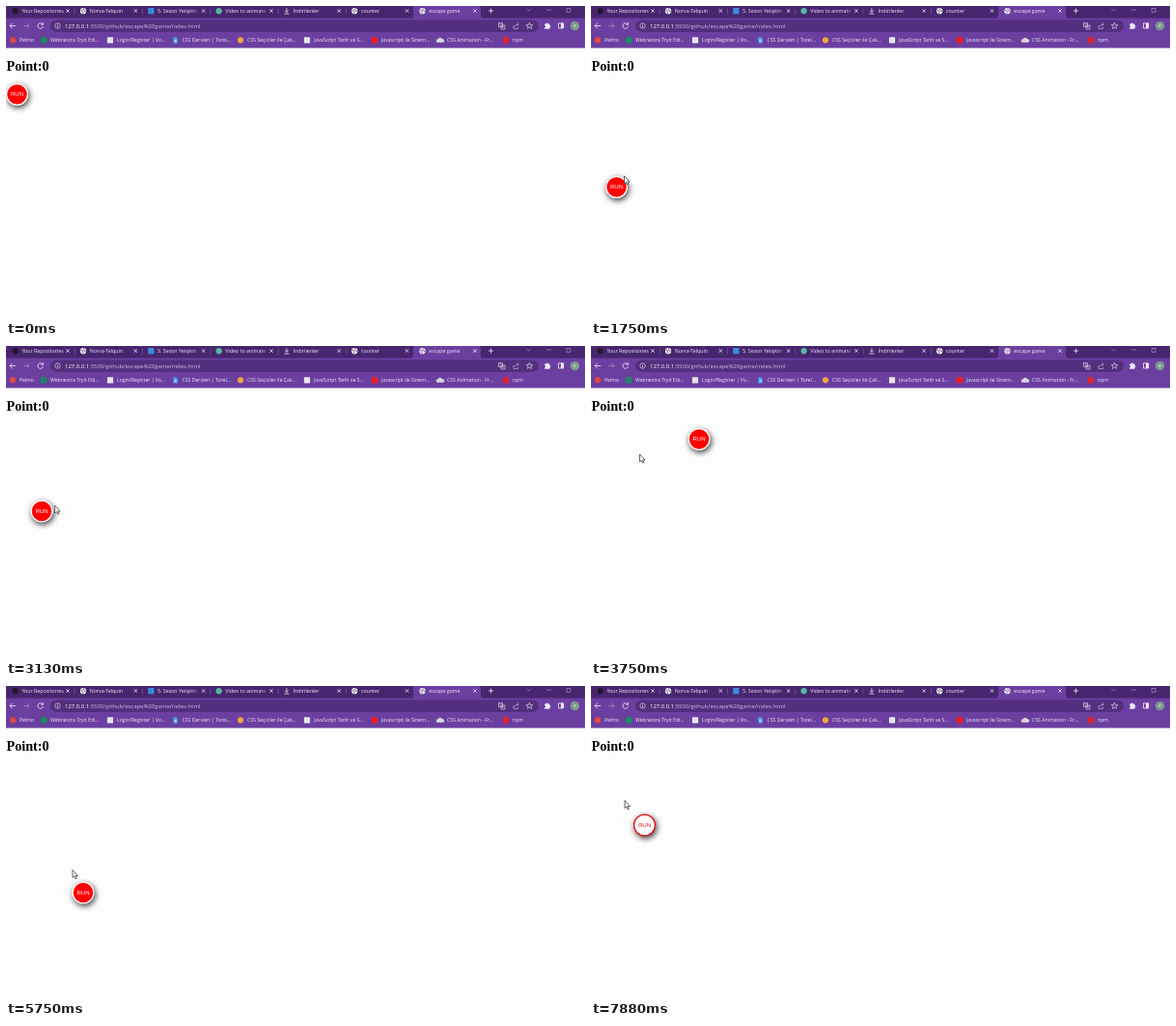
Write an HTML page that moves like this. It is 600 by 323 pixels and loops after 8000 ms.

```html
<!DOCTYPE html>
<html lang="tr">
<head>
<meta charset="utf-8">
<title>escape game</title>
<style>
  html, body { margin: 0; width: 100%; height: 100%; overflow: hidden; background: #fdfdfe; }
  svg { display: block; width: 100vw; height: 100vh; }
  text { font-family: "Open Sans", "Noto Sans", sans-serif; white-space: pre; }
  .heading { font: bold 14.2px "Liberation Serif", Times, serif; }
  .label { font: 6.1px "Liberation Sans", Arial, sans-serif; text-anchor: middle; }
  .line { fill: none; stroke: #f1eaf8; stroke-width: .8; }
</style>
</head>
<body>
<svg id="stage" viewBox="0 0 600 323" preserveAspectRatio="none">
  <defs>
    <linearGradient id="fade">
      <stop offset="0" stop-color="#47266f" stop-opacity="0"/>
      <stop offset="1" stop-color="#47266f"/>
    </linearGradient>
    <filter id="blur" x="-100%" y="-100%" width="300%" height="300%">
      <feGaussianBlur stdDeviation="3.4"/>
    </filter>
    <g id="globe">
      <circle r="3.1" fill="#f7f3fb"/>
      <path d="M-2.3-.9Q-.6-.9-.4.3T-.7 2.4M.5-2.6Q0-.9 1.1-.6T2.4.7" fill="none" stroke="#4b2b73" stroke-width=".8"/>
    </g>
    <path id="close" d="M-1.7-1.7 1.7 1.7M1.7-1.7-1.7 1.7" class="line"/>
  </defs>

  <rect width="600" height="323" fill="#fdfdfe"/>
  <rect width="600" height="13" fill="#47266f"/>
  <rect y="12.5" width="600" height="31" fill="#6b3fa0"/>
  <path d="M419 13Q422 13 422 10V2Q422 0 424 0H490Q492 0 492 2V10Q492 13 495 13Z" fill="#6b3fa0"/>
  <g id="tabs"></g>

  <g class="line">
    <path d="M502.5 2.5V7.5M500 5H505"/>
    <path d="M539.3 3 541.5 5 543.7 3M560 4H565M581 2.5h4v3.8h-4z" stroke-width=".6" opacity=".65"/>
  </g>

  <rect x="46" y="14.5" width="506" height="12.4" rx="6.2" fill="#52307e"/>
  <g class="line">
    <path d="M10 20.5H4M6.8 17.7 4 20.5 6.8 23.3"/>
    <path d="M18 20.5H24M21.2 17.7 24 20.5 21.2 23.3" opacity=".4"/>
    <path d="M38.1 18.9A2.8 2.8 0 1 0 38.5 21.2M38.5 17.2V19.3H36.3"/>
    <circle cx="53.5" cy="20.5" r="2.7" stroke-width=".6"/>
    <path d="M53.5 20V22M53.5 18.7V19.3" stroke-width=".7"/>
    <path d="M510.5 17.5h4v4h-4zM513 20h4v4h-4zM511.5 19h2M514 22h2" stroke-width=".6"/>
    <path d="M526 20V23.5H530.5V22M527 21.5Q527.5 19 531 19M529.5 17.3 531.3 19 529.5 20.7" stroke-width=".6" opacity=".8"/>
    <path d="M542.5 17.2 543.4 19.5 545.8 19.6 543.9 21.1 544.6 23.4 542.5 22.1 540.4 23.4 541.1 21.1 539.2 19.6 541.6 19.5Z" stroke-width=".6"/>
    <path d="M572.5 17.8h5.2v5.2h-5.2z"/>
  </g>
  <path d="M575 17.8h2.7v5.2h-2.7z" fill="#f1eaf8"/>
  <path d="M558.2 18.6h1.6a1 1 0 1 1 2 0h1.6v1.7a1 1 0 1 1 0 2v1.4h-5.2v-1.6a.9.9 0 1 0 0-1.8z" fill="#f1eaf8"/>
  <circle cx="589.5" cy="20.6" r="4.7" fill="#7d9c8e"/>
  <text x="588" y="22.2" font-size="5" fill="#e8f0ec">e</text>
  <text x="61" y="22.7" font-size="5.95" fill="#cdbde2"><tspan fill="#fff">127.0.0.1</tspan>:5500/github/escape%20game/index.html</text>
  <g id="bookmarks"></g>

  <text class="heading" x=".5" y="66.5">Point:0</text>
  <g id="button">
    <circle cx="1.2" cy="2.3" r="11.4" fill="#000" opacity=".82" filter="url(#blur)"/>
    <circle id="face" r="10.9" stroke-width="1.3"/>
    <text id="run" class="label" y="1.9">RUN</text>
  </g>
  <path id="cursor" d="M0 0V8L1.8 6.4 3.1 9.2 4.3 8.7 3.1 6H5.5Z" fill="#fff" stroke="#333" stroke-width=".75" stroke-linejoin="round"/>
</svg>
<script>
const $ = id => document.getElementById(id);
const LOOP = 8000, STEP = 125;

const text = (x, y, size, content) =>
  `<text x="${x}" y="${y}" font-size="${size}" fill="#f1eaf8">${content}</text>`;
const globe = (x, y) => `<use href="#globe" x="${x}" y="${y}"/>`;
const dot = (x, y, color) => `<circle cx="${x}" cy="${y}" r="3.1" fill="${color}"/>`;
const block = (x, y, color) =>
  `<rect x="${x - 3.1}" y="${y - 3.1}" width="6.2" height="6.2" rx=".5" fill="${color}"/>`;
const download = (x, y) =>
  `<path class="line" d="M${x} ${y - 3}v4M${x - 1.8} ${y - .6}l1.8 1.8 1.8-1.8M${x - 2.5} ${y + 2.8}h5"/>`;
const sheet = (x, y) =>
  `<path d="M${x - 2.2} ${y - 3}h3l1.6 1.6v4.5h-4.6z" fill="#4a9df0"/><path class="line" d="M${x - 1} ${y}h2M${x - 1} ${y + 1.4}h2" stroke-width=".5"/>`;
const cloud = (x, y) =>
  `<path d="M${x - 3} ${y + 2.5}a1.8 1.8 0 0 1 .6-3.5 2.5 2.5 0 0 1 4.6 0 1.8 1.8 0 0 1 .8 3.5z" fill="#d9d6de"/>`;

const tabs = [
  ["Your Repositories", dot, "#24182f"],
  ["Norva-Telquin", globe],
  ["5. Sezon Yetişkin", block, "#3b8be0"],
  ["Video to animate", dot, "#58b8a5"],
  ["İndirilenler", download],
  ["counter", globe],
  ["escape game", globe]
];
$("tabs").innerHTML = tabs.map(([title, icon, color], i) => {
  const x = i * 70.3, close = i < 6 ? 64 + x : 486;
  const fade = i === 2 || i === 3
    ? `<rect x="${close - 11}" y="1" width="8" height="10" fill="url(#fade)"/><rect x="${close - 3.1}" y="1" width="7" height="10" fill="#47266f"/>`
    : "";
  const divider = i < 5 ? `<path d="M${71.2 + x} 2.5v6" stroke="#8a6fae" stroke-width=".5"/>` : "";
  return icon(9.7 + x, 5.2, color) + text(16.4 + x, 7.1, 5.3, title) + fade +
    `<use href="#close" x="${close}" y="5"/>` + divider;
}).join("");

const bookmarks = [
  [7, "Pelmo", dot, "#e2493f"],
  [39, "Webnestra Tryit Edi...", block, "#178a61"],
  [108, "Login/Register | Vo...", block, "#e9e4ee"],
  [175.5, "CSS Dersleri | Torel...", sheet],
  [243, "CSS Seçiciler ile Çak...", dot, "#f0a63c"],
  [312, "JavaScript Tarih ve S...", block, "#e9e6ec"],
  [382, "Javascript ile Sinem...", block, "#f01d1d"],
  [450, "CSS Animation - Fr...", cloud],
  [518, "npm", block, "#dc2430"]
];
$("bookmarks").innerHTML = bookmarks.map(([x, title, icon, color]) =>
  icon(x, 35.3, color) + text(x + 7, 37.2, 5.15, title)).join("");

// Button places: [time, x, y]
const jumps = [
  [0, 11.5, 91.5], [375, 100, 280], [750, 14, 232], [1375, 26.5, 187.5],
  [1875, 60, 195], [2250, 141.5, 172.5], [2625, 37, 171], [3250, 112, 96.5],
  [4000, 115, 169], [4500, 53.5, 227], [5125, 23, 150], [5500, 80, 214],
  [5875, 138, 130], [6375, 20.5, 148.5], [6875, 110, 100], [7250, 30, 115],
  [7875, 55.5, 144]
];
// Pointer stops: [time, x, y]
const stops = [
  [125, 70, 140], [375, 17, 98], [750, 95, 270], [1375, 20, 225],
  [1750, 34.5, 176], [1875, 32, 182], [2250, 62, 188], [2500, 129.5, 175],
  [2625, 134, 174], [3250, 41, 164], [3750, 50.5, 112], [4000, 104, 100],
  [4500, 114.5, 167], [4750, 114.5, 167], [5125, 59, 218], [5500, 29, 146],
  [5875, 83, 206], [6375, 129, 131], [6625, 51.5, 149], [6875, 28, 148],
  [7250, 106, 101], [7750, 35, 118.5], [8000, 35, 118.5]
];

const latest = (list, t) => list.reduce((found, item, i) => item[0] <= t ? i : found, 0);
const ease = p => p * p * (3 - 2 * p);
const move = (node, x, y) => node.setAttribute("transform", `translate(${x} ${y})`);

function pointerAt(t) {
  const i = Math.min(latest(stops, t), stops.length - 2);
  const [t0, x0, y0] = stops[i], [t1, x1, y1] = stops[i + 1];
  const p = ease((t - t0) / (t1 - t0));
  return [x0 + (x1 - x0) * p, y0 + (y1 - y0) * p];
}

function draw(time) {
  const t = Math.floor(time % LOOP / STEP) * STEP;
  const [since, x, y] = jumps[latest(jumps, t)];
  const hovered = since > 0 && t - since < STEP;
  move($("button"), x, y);
  $("face").setAttribute("fill", hovered ? "#fff" : "#f00");
  $("face").setAttribute("stroke", hovered ? "#e81313" : "#fff");
  $("run").setAttribute("fill", hovered ? "#e81313" : "#fff");

  const visible = t >= stops[0][0];
  $("cursor").setAttribute("visibility", visible ? "visible" : "hidden");
  if (visible) move($("cursor"), ...pointerAt(t));
}

const start = performance.now();
function tick() {
  draw(performance.now() - start);
  requestAnimationFrame(tick);
}
tick();
</script>
</body>
</html>
```
